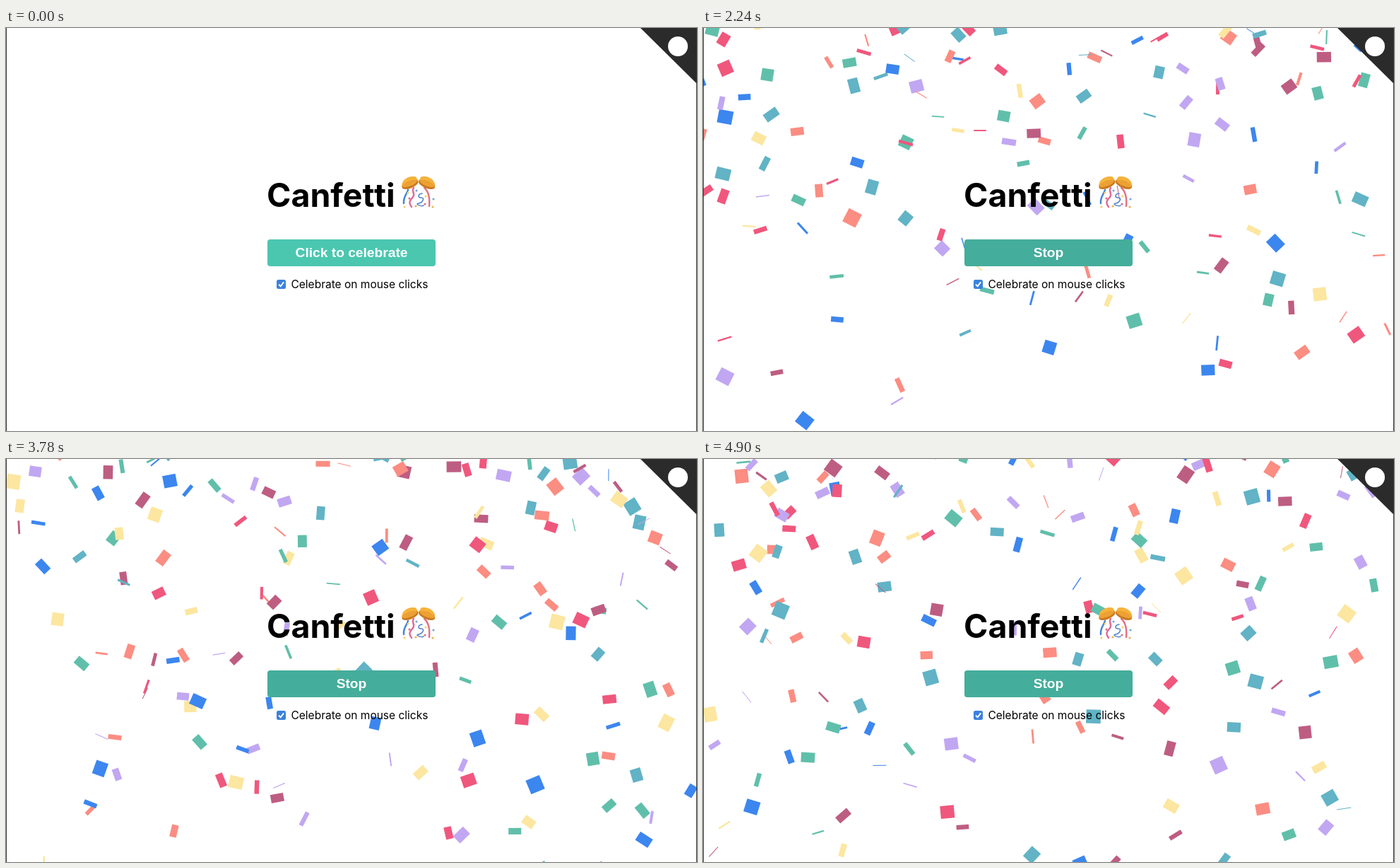
These frames come from a looping animation (978 by 570 pixels, 4970 ms). An HTML page with a canvas:

```html
<!DOCTYPE html>
<html lang="en">
<head>
<meta charset="utf-8">
<title>Canfetti</title>
<style>
  html, body { margin: 0; width: 978px; height: 570px; overflow: hidden; background: #fff; }
  canvas, svg { position: absolute; left: 0; top: 0; }
  text { font-family: Inter, sans-serif; }
  .title { font-size: 46.5px; font-weight: 700; }
  .label { font-size: 15.5px; }
  .button { font: 700 19.2px "Liberation Sans", Arial, sans-serif; fill: #fff; text-anchor: middle; }
  .ribbons { fill: none; stroke-width: 2.4; stroke-linecap: round; }
</style>
</head>
<body>
<canvas id="stage" width="978" height="570"></canvas>
<svg width="978" height="570">
  <defs>
    <g id="bowl">
      <path d="M560.5 226C558 216 569 208 580 210.500L584 217Z" fill="#f6b23c"/>
      <ellipse cx="572" cy="221.500" rx="12.200" ry="5" transform="rotate(-22 572 221.500)" fill="#c97a22"/>
      <ellipse cx="571.500" cy="220" rx="11" ry="3.600" transform="rotate(-22 571.500 220)" fill="#eda134"/>
    </g>
  </defs>

  <text class="title" x="369" y="252.500">Canfetti</text>

  <g class="ribbons">
    <path d="M569 229C567 236 562 239 563 248" stroke="#4584d2"/>
    <path d="M577 226C573 231 580 234 576 239S569 246 574 253" stroke="#e26a91"/>
    <path d="M589 234C582 235 583 240 588 240S590 247 584 248S588 253 591 251" stroke="#5287cc" stroke-width="1.6"/>
    <path d="M592 226C598 231 600 240 599 252" stroke="#e17183"/>
  </g>
  <g id="dots"></g>
  <use href="#bowl"/>
  <use href="#bowl" transform="translate(1167.5) scale(-1 1)"/>

  <rect id="button" x="370" y="299" width="238" height="38" rx="4"/>
  <text id="caption" class="button" x="489" y="324"></text>

  <rect x="383" y="356" width="13" height="13" rx="2.5" fill="#3b82dc"/>
  <path d="M386 362.7l2.6 2.7 4.6-6" fill="none" stroke="#fff" stroke-width="1.9"/>
  <text class="label" x="403.5" y="368">Celebrate on mouse clicks</text>

  <path d="M898 0H978V79Z" fill="#2b2b2b"/>
  <circle cx="951" cy="26" r="14" fill="#fff"/>
  <path d="M.5 0V570M977.5 0V570" stroke="#333"/>
</svg>
<script>
const LOOP = 4970, STEP = 70, CLICK = 630, START = 640, GAP = 10;
const COLORS = ['#3c86ef', '#f0577d', '#c1a7f2', '#fce6a0', '#60bfaa', '#61b3c5', '#fb8d82', '#be5d82'];
const ctx = document.getElementById('stage').getContext('2d');
const button = document.getElementById('button');
const caption = document.getElementById('caption');

let seed = 29;
function random(min, max) {
  seed = (seed * 1664525 + 1013904223) % 4294967296;
  return min + (max - min) * seed / 4294967296;
}

const pieces = Array.from({ length: Math.ceil((LOOP - START) / GAP) }, (_, i) => ({
  born: START + i * GAP,
  x: random(0, 978),
  drift: random(-25, 25),
  pace: random(.65, 1),
  size: random(17, 21),
  angle: random(0, 2 * Math.PI),
  spin: random(-3, 3),
  tilt: random(0, 2),
  tumble: random(.6, 2),
  color: COLORS[Math.floor(random(0, COLORS.length))]
}));

// Each piece falls under gravity, turns in the plane and swings evenly from full width to edge-on.
function drawPiece(p, now) {
  const age = (now - p.born) / 1000;
  if (age < 0) return;
  const y = p.pace * (130 * age + 160 * age * age) - 20;
  if (y > 590) return;
  const height = Math.max(1, p.size * Math.abs(1 - (p.tilt + p.tumble * age) % 2));
  ctx.save();
  ctx.translate(p.x + p.drift * age, y);
  ctx.rotate(p.angle + p.spin * age);
  ctx.fillStyle = p.color;
  ctx.fillRect(-p.size / 2, -height / 2, p.size, height);
  ctx.restore();
}

function render(time) {
  const now = Math.floor(time % LOOP / STEP) * STEP;
  const running = now >= CLICK;
  caption.textContent = running ? 'Stop' : 'Click to celebrate';
  button.setAttribute('fill', running ? '#45ad9b' : '#4bc7b0');
  ctx.clearRect(0, 0, 978, 570);
  pieces.forEach(p => drawPiece(p, now));
  requestAnimationFrame(render);
}

const dots = [[564, 253], [571, 241], [581, 230], [580, 252], [594, 238], [593, 249], [605, 242], [604, 253], [569, 233]];
document.getElementById('dots').innerHTML = dots.map(([x, y], i) =>
  `<circle cx="${x}" cy="${y}" r="1.6" fill="${['#f7cf62', '#df6b8b', '#78a7da', '#eeb24c'][i % 4]}"/>`).join('');

requestAnimationFrame(render);
</script>
</body>
</html>
```
